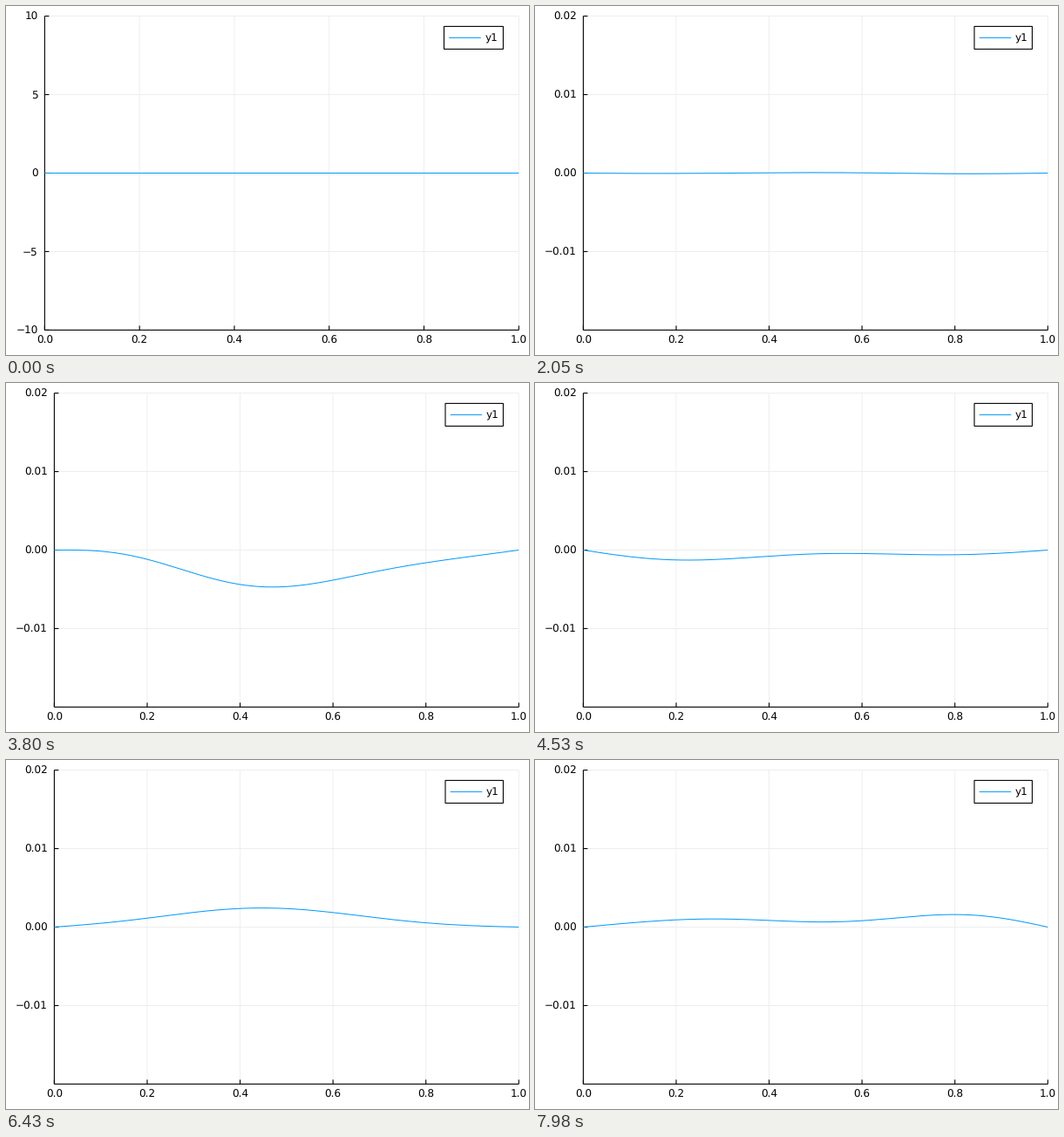
Write a matplotlib script that moves like this. It is 600 px wide and 400 px high and loops after 8000 ms.

```python
import numpy as np
import matplotlib.pyplot as plt
from matplotlib.animation import FuncAnimation
from matplotlib.patches import Rectangle

W, H, DPI = 600, 400, 100
FRAMES, STEP = 320, 25
PX = 72 / DPI
RIGHT, TOP, BOTTOM = 588.3, 11.6, 371.4
ZERO = (TOP + BOTTOM) / 2
BLUE, GRID = "#009afa", "#ededed"

plt.rcParams["font.family"] = "DejaVu Sans"
plt.rcParams["font.size"] = 12 * PX
plt.rcParams["text.hinting"] = "none"
plt.rcParams["path.snap"] = False

# main swing of the string: (ms, height in pixels)
SWING = np.array([(0, 0), (800, -2), (1350, 17), (2050, 0), (2730, -24),
                  (3310, -44), (3800, -34), (4500, -9), (5230, 18),
                  (5700, 19), (6430, 18), (7980, 11)], float)
T, Y = SWING.T
SLOPE = np.gradient(Y, T)

xs = np.linspace(0, 1, 201)
SINES = np.sin(np.pi * np.outer(np.arange(1, 5), xs))


def swing(t):
    """Smooth curve through the swing points."""
    i = np.clip(np.searchsorted(T, t, side="right") - 1, 0, len(T) - 2)
    h = T[i + 1] - T[i]
    s = (t - T[i]) / h
    ease = s * s * (3 - 2 * s)
    bend = s * (1 - s) * h * ((1 - s) * SLOPE[i] - s * SLOPE[i + 1])
    return Y[i] + (Y[i + 1] - Y[i]) * ease + bend


def wave(t, period, peak):
    return np.cos(2 * np.pi * (t - peak) / period)


def string(t):
    """Height of the string in pixels: four sine modes, eased in from rest."""
    rise = min(1, t / 800)
    b1 = swing(t)
    b2 = -3.3 * rise * wave(t, 3680, 1100)
    b3 = rise * (5.5 * wave(t, 2150, 3580) + 0.7) - 0.08 * b1
    b4 = 0.3 * b2 - 0.08 * b1
    return np.array([b1, b2, b3, b4]) @ SINES


fig = plt.figure(figsize=(W / DPI, H / DPI), dpi=DPI, facecolor="white")
ax = fig.add_axes([0, 0, 1, 1])
ax.set_xlim(0, W)
ax.set_ylim(H, 0)
ax.axis("off")


def stroke(x, y, color="black", width=1.1, z=2):
    return ax.plot(x, y, color=color, lw=width * PX, zorder=z,
                   solid_capstyle="butt")[0]


def label(x, y, s, ha):
    return ax.text(x, y + 4.3, s, ha=ha, va="baseline", zorder=6)


def chart(left, ylabels, key_x):
    """Axes, grid, labels and legend; returns every artist made."""
    parts = []
    for i in range(6):
        x = left + (RIGHT - left) * i / 5
        parts += [
            stroke([x, x], [TOP, BOTTOM], GRID, 0.9, 1),
            stroke([x, x], [BOTTOM, BOTTOM - 5]),
            label(x, 383, f"{i / 5:.1f}", "center"),
        ]
    for i, s in enumerate(ylabels):
        y = TOP + (BOTTOM - TOP) * i / 4
        parts += [
            stroke([left, RIGHT], [y, y], GRID, 0.9, 1),
            stroke([left, left + 5], [y, y]),
            label(left - 7.6, y, s, "right"),
        ]
    box = Rectangle((key_x, 23.4), 570.4 - key_x, 26, fc="white", ec="black",
                    lw=1.1 * PX, zorder=5)
    parts += [
        stroke([left, left], [TOP, BOTTOM]),
        stroke([left, RIGHT], [BOTTOM, BOTTOM]),
        ax.add_patch(box),
        stroke([key_x + 5.7, key_x + 42.3], [36.4, 36.4], BLUE, 1, 6),
        label(key_x + 47, 36.6, "y1", "left"),
    ]
    return parts


LEFT0, LEFT1 = 44.4, 55.4
wide = chart(LEFT0, ["10", "5", "0", "\u22125", "\u221210"], 502.5)
close = chart(LEFT1, ["0.02", "0.01", "0.00", "\u22120.01"], 504)
curve = stroke([], [], BLUE, 1, 4)


def draw(k):
    first = k == 0
    for p in wide:
        p.set_visible(first)
    for p in close:
        p.set_visible(not first)
    left = LEFT0 if first else LEFT1
    curve.set_data(left + (RIGHT - left) * xs, ZERO - string(k * STEP))
    return [curve]


anim = FuncAnimation(fig, draw, frames=FRAMES, interval=STEP, repeat=True,
                     repeat_delay=0, init_func=lambda: draw(0), blit=False)
plt.show()
```
